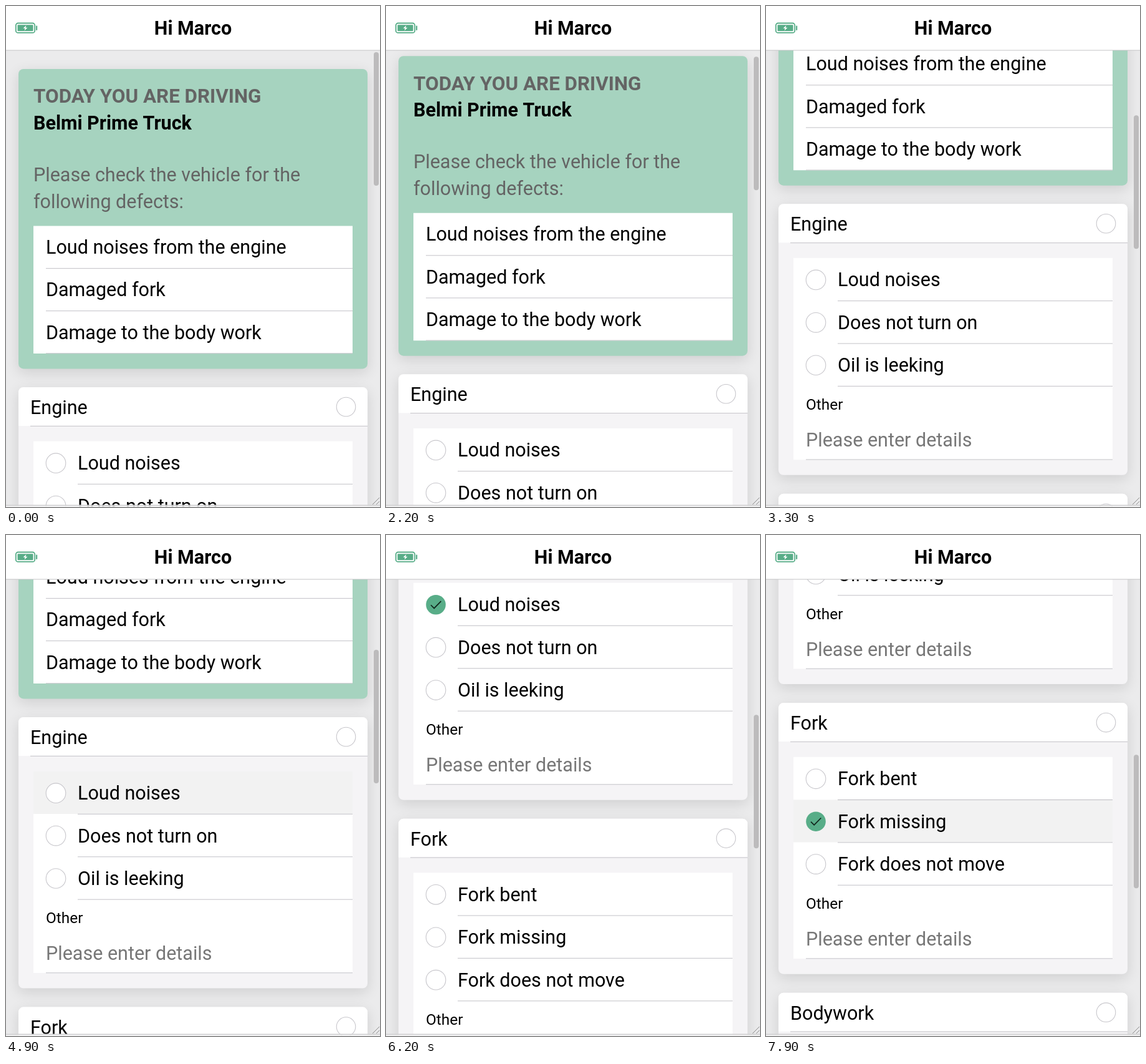
An HTML page with a canvas that plays this animation: 600 px wide and 803 px high, repeating every 8 s.

```html
<!DOCTYPE html>
<html lang="en">
<head>
<meta charset="utf-8">
<style>
  html, body { margin: 0; width: 100%; height: 100%; overflow: hidden; background: #fff; }
  canvas { display: block; }
</style>
</head>
<body>
<canvas width="600" height="803"></canvas>
<script>
const ctx = document.querySelector('canvas').getContext('2d');
const LOOP = 8000, SIZE = 30.5, ROW = 68.4, CARD = 464.6;
const GREEN = '#58ad88', LINE = '#c8c7cc';

// [time, value] pairs, linear in between
const SCROLL = [[2100, 0], [2200, 20.5], [2800, 166], [3400, 319], [5450, 319], [5800, 434.5], [6600, 806.5]];
const LOUD_SHADE = [[4600, 0], [4800, 1], [6000, 1], [6200, 0]];
const MISSING_SHADE = [[6600, 0], [6700, 0.5], [7400, 0.5], [7550, 1]];

const CARDS = [
  { title: 'Engine', rows: ['Loud noises', 'Does not turn on', 'Oil is leeking'], active: 0, shade: LOUD_SHADE, checkAt: 5200 },
  { title: 'Fork', rows: ['Fork bent', 'Fork missing', 'Fork does not move'], active: 1, shade: MISSING_SHADE, checkAt: 7450 },
  { title: 'Bodywork', rows: [] }
];

function track(keys, t) {
  if (t <= keys[0][0]) return keys[0][1];
  for (let i = 1; i < keys.length; i++) {
    const [t0, a] = keys[i - 1], [t1, b] = keys[i];
    if (t < t1) return a + (b - a) * (t - t0) / (t1 - t0);
  }
  return keys[keys.length - 1][1];
}

function text(str, x, y, { color = '#000', size = SIZE, weight = 400, align = 'left' } = {}) {
  ctx.font = `${weight} ${size}px Roboto, sans-serif`;
  ctx.textAlign = align;
  ctx.fillStyle = color;
  ctx.fillText(str, x, y);
}

function rect(x, y, w, h, color) {
  ctx.fillStyle = color;
  ctx.fillRect(x, y, w, h);
}

function round(x, y, w, h, r, color) {
  ctx.beginPath();
  ctx.roundRect(x, y, w, h, r);
  ctx.fillStyle = color;
  ctx.fill();
}

function path(points, color, width) {
  ctx.beginPath();
  points.forEach(([x, y]) => ctx.lineTo(x, y));
  ctx.strokeStyle = color;
  ctx.lineWidth = width;
  ctx.stroke();
}

const rule = (x, y, end) => rect(x, y - 0.5, end - x, 1.1, LINE);

function panel(y, h, color) {
  ctx.save();
  ctx.shadowColor = 'rgba(0,0,0,.12)';
  ctx.shadowBlur = 22;
  ctx.shadowOffsetY = 6;
  round(20, y, 560, h, 8, color);
  ctx.restore();
}

function circle(x, y, r, checked) {
  ctx.beginPath();
  ctx.arc(x, y, r, 0, 7);
  ctx.fillStyle = checked ? GREEN : '#fff';
  ctx.fill();
  if (checked) {
    path([[x - 8, y + 0.5], [x - 2.8, y + 5.7], [x + 8.3, y - 5.7]], '#10251b', 1.7);
  } else {
    ctx.strokeStyle = LINE;
    ctx.lineWidth = 1.1;
    ctx.stroke();
  }
}

function vehicle() {
  const grey = '#646464';
  panel(101, 480.4, '#a6d3bf');
  text('TODAY YOU ARE DRIVING', 44, 155.3, { color: grey, weight: 700, size: 31.4 });
  text('Belmi Prime Truck', 44, 197.5, { weight: 700 });
  text('Please check the vehicle for the', 44, 280.5, { color: grey });
  text('following defects:', 44, 323.5, { color: grey });
  rect(44, 352.5, 512, 204.5, '#fff');
  ['Loud noises from the engine', 'Damaged fork', 'Damage to the body work'].forEach((s, i) => {
    text(s, 64, 397 + i * ROW);
    rule(64, 420.5 + i * 68.1, 556);
  });
}

function checklist({ title, rows, active, shade, checkAt }, y, t) {
  panel(y, 434.6, '#f5f4f6');
  round(20, y, 560, 62, [8, 8, 0, 0], '#fff');
  text(title, 39, y + 43);
  circle(545.5, y + 31.5, 15.3);
  rule(39, y + 62.3, 580);
  if (!rows.length) return;
  rect(44, y + 86.7, 512, 323.3, '#fff');
  rows.forEach((s, i) => {
    const top = y + 86.7 + i * ROW;
    if (i === active) rect(44, top, 512, ROW, `rgba(0,0,10,${0.05 * track(shade, t)})`);
    circle(80, top + 35, 15.8, i === active && t >= checkAt);
    text(s, 115, top + 45.5);
    rule(115, top + 68.6, 556);
  });
  text('Other', 64, y + 330, { size: 24.4 });
  text('Please enter details', 64, y + 389, { color: '#777' });
  rule(64, y + 409.7, 556);
}

function header() {
  rect(0, 0, 600, 71, '#fff');
  rect(0, 70.5, 600, 1, '#c4c4c5');
  text('Hi Marco', 300, 46, { weight: 700, align: 'center' });
  ctx.beginPath();
  ctx.roundRect(15.8, 27.5, 30.4, 15.4, 3.5);
  ctx.strokeStyle = GREEN;
  ctx.lineWidth = 1.8;
  ctx.stroke();
  round(18.5, 30.2, 25, 10, 1, GREEN);
  round(48, 31.5, 2.2, 7.4, 1, GREEN);
  ctx.beginPath();
  [[32.5, 31], [27.5, 35.8], [30.6, 35.8], [29.6, 39.6], [34.5, 34.7], [31.4, 34.7]].forEach(p => ctx.lineTo(...p));
  ctx.fillStyle = '#fff';
  ctx.fill();
}

function draw(t) {
  const scroll = track(SCROLL, t);
  rect(0, 0, 600, 803, '#ebebec');
  ctx.save();
  ctx.translate(0, -scroll);
  vehicle();
  CARDS.forEach((card, i) => checklist(card, 611 + i * CARD, t));
  ctx.restore();
  round(590, 74 + scroll * 0.345, 8, 214, 4, '#bcbbbc');
  header();
  path([[588, 799], [599, 788]], '#8c8c8c', 1);
  path([[594, 799], [599, 794]], '#8c8c8c', 1);
  rect(0, 799.5, 600, 2, '#d2d2d3');
  rect(0, 801.5, 600, 1.5, '#f6f6f6');
}

const start = performance.now();
function frame() {
  draw((performance.now() - start) % LOOP);
  requestAnimationFrame(frame);
}
frame();
</script>
</body>
</html>
```
